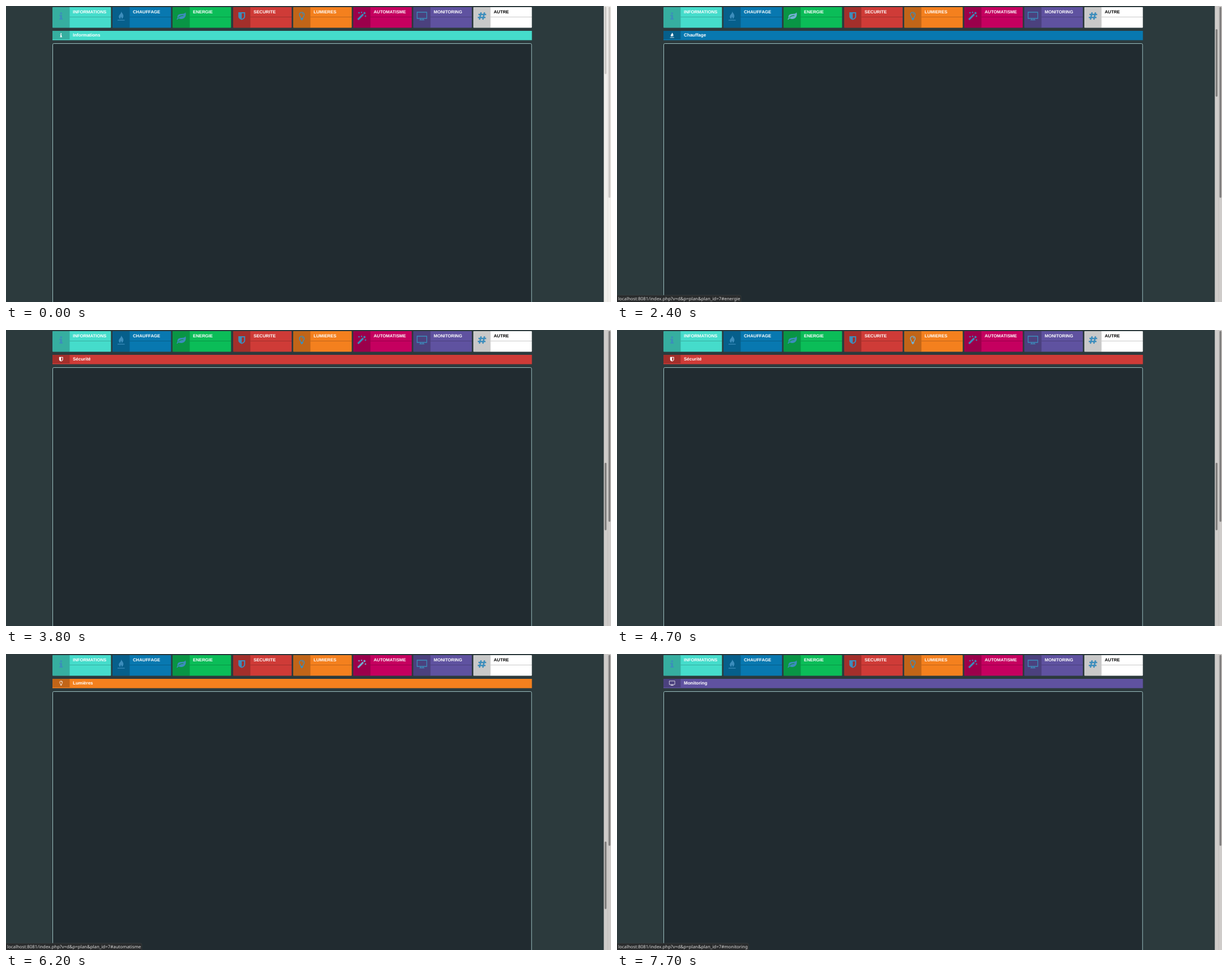
Recreate the animation shown at these times as an HTML page. Size 1068 px wide and 524 px high, loop 8000 ms.

```html
<!DOCTYPE html>
<html lang="fr">
<head>
<meta charset="utf-8">
<title>Menu domotique</title>
<style>
  html, body { margin: 0; width: 100%; height: 100%; overflow: hidden; background: #2c3a3d; }
  svg { display: block; }
  text { text-rendering: geometricPrecision; }
  .label, #title { font-family: "Liberation Sans", Arial, sans-serif; font-weight: bold; fill: #fff; }
  .label { font-size: 7.75px; }
  .label.black { fill: #000; }
  #title { font-size: 8px; }
  #status text { font: 7.86px "Noto Sans", sans-serif; fill: #dcdcdc; }
  .icon { color: #3c8dbc; fill: currentColor; }
  .icon.lit { color: #72afd2; }
  .shade { fill: #000; opacity: .21; }
  .line { fill: none; stroke: currentColor; }
</style>
</head>
<body>
<svg width="1068" height="524" viewBox="0 0 1068 524">
  <rect width="1068" height="524" fill="#2c3a3d"/>
  <g id="menu"></g>
  <rect id="bar" x="82" y="44" width="846.4" height="16.5"/>
  <rect class="shade" x="82" y="44" width="30.4" height="15"/>
  <g id="mark" style="color:#fff" fill="currentColor" transform="translate(97.2 51.6) scale(.57)"></g>
  <text id="title" x="118" y="54.4"></text>
  <rect x="82.5" y="66.5" width="845.3" height="470" rx="2" fill="#212b30" stroke="#9cc0c0"/>
  <rect id="track" x="1055.3" width="13" height="524"/>
  <rect x="1061.8" width=".7" height="524" opacity=".08"/>
  <g id="thumbs">
    <rect id="inner" x="1056.8" width="3.3" height="119.5" rx="1.6"/>
    <rect x="1063.6" y="1.5" width="3.3" height="338" rx="1.6"/>
  </g>
  <g id="status">
    <rect x="-3" y="512" height="15" rx="2.5" fill="#292b2c" stroke="#3d4343" stroke-width=".6"/>
    <text x="2" y="520.6"></text>
  </g>
</svg>
<script>
const $ = id => document.getElementById(id);

const line = (width, d) => `<path class="line" stroke-width="${width}" d="${d}"/>`;
const solid = d => `<path fill-rule="evenodd" d="${d}"/>`;

const icons = {
  info: solid('M-3-2H1.6V4.3H3V6.3H-3V4.3H-1.6V0H-3zM-1.6-6.3H1.6V-3.5H-1.6z'),
  flame: solid('M0-8C1.5-5 4.6-3 4 .8 3.6 3 2.4 4.4 1 5.2 1.6 3.4 .8 2.2-.4 1.2-.4 3-1.6 3.6-1.4 5.2-3.4 4.4-4.8 2-3.8-.4-3-2.6 .4-4.4 0-8zM-6.3 6.7H6.3V8H-6.3z'),
  leaf: solid('M7.8-6.5C9.5-1 7 5 1 5.2-1.5 5.3-3 4.6-4.6 4.2-6 5-6 6.5-7.2 6.5-8.4 6.2-7.8 4.8-6.3 3.6-7.5-1.5-4-3.6 0-3.8 4-4 6-4 7.8-6.5zM-4.6 3.2C-2 .6 1-.3 4-.3V-1.5C1-1.5-2.6-.6-5.2 2.4z'),
  shield: solid('M-6-6.7H6V1C6 4 2.5 6 0 7-2.5 6-6 4-6 1zM0-4.8V5C2 4.2 4 3 4 1V-4.8z'),
  bulb: line(1.4, 'M-2 3.2C-2 1-4.3 0-4.3-2.4A4.3 4.2 0 0 1 4.3-2.4C4.3 0 2 1 2 3.2M-2.4 4H2.4M-2.2 5.6H2.2M-1 6.8H1M0-4.6A2 2 0 0 1 2-2.8'),
  wand: line(3.2, 'M-7 6.4L2.4-3M3.4-4L5.8-6.4') + line(1.3, 'M-5-7v2.6M-6.3-5.7h2.6M-.6-7.6v2.4M-1.8-6.4h2.4M6.4-1.2v2.6M5.1 .1h2.6'),
  screen: line(1.3, 'M-8.5-6.7H8.5V4.3H-8.5zM-2 4.3V7M2 4.3V7M-4.3 7H4.3'),
  hash: line(2.5, 'M-1.5-6.4L-4.5 6.4M4.5-6.4L1.5 6.4M-6.2-2.6H7.4M-7.4 2.6H6.2')
};

const tiles = [
  ['Informations', 'info', '#45dccb'],
  ['Chauffage', 'flame', '#0878b0'],
  ['Energie', 'leaf', '#0bbd58'],
  ['Sécurité', 'shield', '#cf3b37'],
  ['Lumières', 'bulb', '#f4801e'],
  ['Automatisme', 'wand', '#c5005f'],
  ['Monitoring', 'screen', '#5f52a0'],
  ['Autre', 'hash', '#ffffff']
].map(([title, icon, color]) => ({
  title, color, icon: icons[icon],
  slug: title.normalize('NFD').replace(/[^a-z]/gi, '').toLowerCase()
}));

$('menu').innerHTML = tiles.map(({ slug, icon, color }, i) => `
  <g transform="translate(${Math.round(82 + i * 106.17)} 2.1)">
    <rect width="103.3" height="36.3" rx="1" fill="${color}"/>
    <rect class="shade" width="30.4" height="36.3" rx="1"/>
    <rect class="shade" x="30.4" y="16.9" width="72.9" height="1"/>
    <text class="label ${color === '#ffffff' ? 'black' : ''}" x="36" y="10.7">${slug.toUpperCase()}</text>
    <g class="icon" transform="translate(15.2 15.6)">${icon}</g>
  </g>`).join('');

const iconEls = document.querySelectorAll('.icon');
const linkText = document.querySelector('#status text');
const linkBox = document.querySelector('#status rect');

// The pointer visits the tiles in turn; times in tenths of a second.
const visit = (tile, enter, leave, show, click, hide) => ({ tile, enter, leave, show, click, hide });
const visits = [
  visit(1, 7, 17, 9, 14, 20),
  visit(2, 19, 28, 19, 25, 25),
  visit(3, 28, 36, 29, 34, 36),
  visit(4, 47, 52, 49, 51, 52),
  visit(5, 56, 66, 58, 63, 64),
  visit(6, 70, 77, 74, 75, 99)
];

// The link bubble fades in and out over two steps.
const ramp = x => Math.min(1, Math.max(0, x / 2));
const opacity = (v, t) => Math.min(ramp(t - v.show + 1), 1 - ramp(t - v.hide + 1));
const latest = (key, t) => visits.findLast(v => v[key] <= t)?.tile ?? 0;

function showSection(n) {
  const { title, icon, color } = tiles[n];
  $('bar').setAttribute('fill', color);
  $('mark').innerHTML = icon;
  $('title').textContent = title;
  $('inner').setAttribute('y', Math.max(1, 97 * n - 56));
}

function showLink(n) {
  linkText.textContent = 'localhost:8081/index.php?v=d&p=plan&plan_id=7#' + tiles[n].slug;
  linkBox.setAttribute('width', linkText.getComputedTextLength() + 6.5);
}

function draw(t) {
  showSection(latest('click', t));
  showLink(latest('show', t));
  $('status').style.opacity = Math.max(...visits.map(v => opacity(v, t)));
  iconEls.forEach((el, i) =>
    el.classList.toggle('lit', visits.some(v => v.tile === i && v.enter <= t && t < v.leave)));
  const focused = t >= 13;
  $('track').setAttribute('fill', focused ? '#cfccca' : '#f1efec');
  $('thumbs').setAttribute('fill', focused ? '#7f7d7c' : '#cac7c4');
}

let last = -1;
function tick() {
  const t = Math.floor(performance.now() % 8000 / 100);
  if (t !== last) draw(last = t);
  requestAnimationFrame(tick);
}
tick();
</script>
</body>
</html>
```
